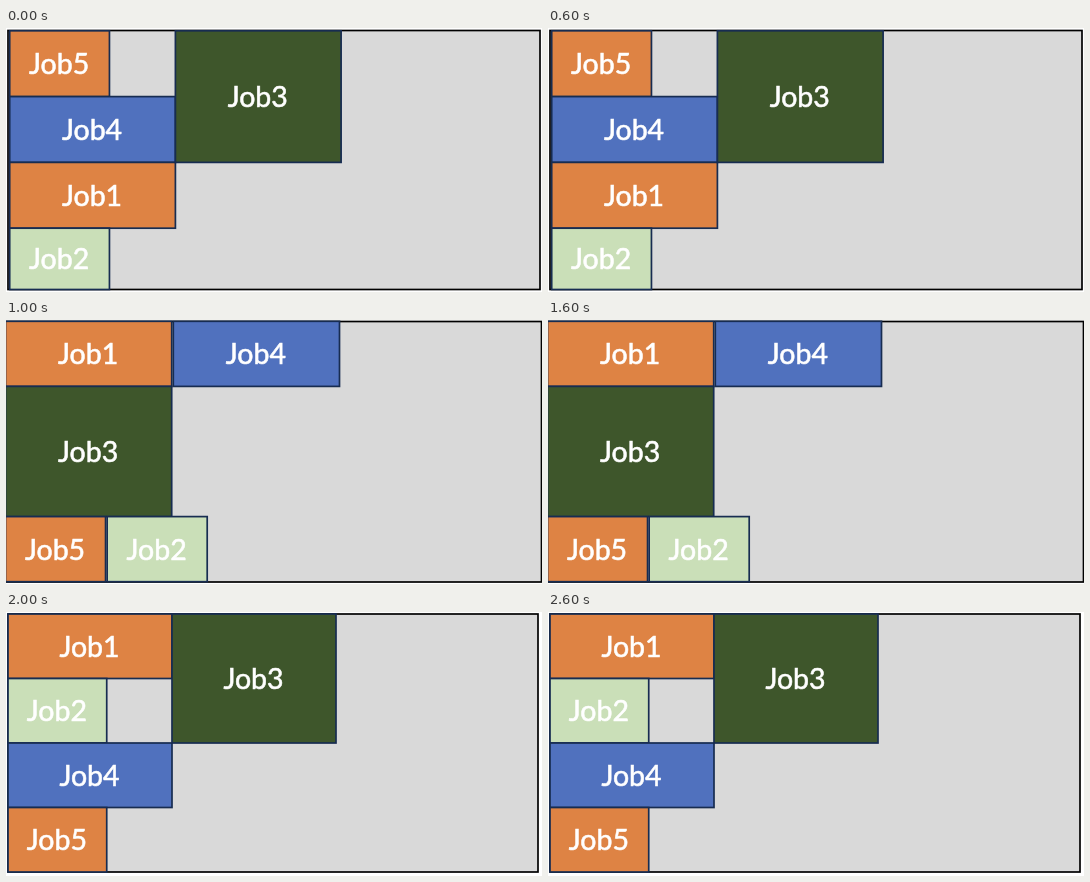
An HTML page with a canvas for the animation above (3000 ms loop, 536 by 264 pixels).

```html
<!DOCTYPE html>
<html lang="en">
<head>
<meta charset="utf-8">
<title>Job packing</title>
<style>
  html, body { margin: 0; overflow: hidden; background: #fff; }
  canvas { display: block; }
</style>
</head>
<body>
<canvas width="536" height="264"></canvas>
<script>
const ctx = document.querySelector('canvas').getContext('2d');
const STEP = 1000;
const SHORT = 0.602;

// Job sizes are in grid cells.
const jobs = {
  Job1: { color: '#de8344', cols: 1, rows: 1 },
  Job2: { color: '#cadfb8', cols: SHORT, rows: 1 },
  Job3: { color: '#3e562b', cols: 1, rows: 2 },
  Job4: { color: '#5071be', cols: 1, rows: 1 },
  Job5: { color: '#de8344', cols: SHORT, rows: 1 }
};

// Each column stacks its jobs downwards from the given row.
const layouts = [
  {
    area: { x: 2, y: 2.5, right: 534, bottom: 261.5 },
    grid: { x: 3.7, y: 2.8, w: 165.7, h: 65.8, gap: 0 },
    columns: [
      { col: 0, row: 0, stack: ['Job5', 'Job4', 'Job1', 'Job2'] },
      { col: 1, row: 0, stack: ['Job3'] }
    ]
  },
  {
    area: { x: -1, y: 1.5, right: 535.5, bottom: 262 },
    grid: { x: -0.5, y: 1.3, w: 166.2, h: 65.1, gap: 1.6 },
    columns: [
      { col: 0, row: 0, stack: ['Job1', 'Job3', 'Job5'] },
      { col: 1, row: 0, stack: ['Job4'] },
      { col: SHORT, row: 3, stack: ['Job2'] }
    ]
  },
  {
    area: { x: 2, y: 2, right: 532, bottom: 260 },
    grid: { x: 2, y: 2, w: 164, h: 64.5, gap: 0 },
    columns: [
      { col: 0, row: 0, stack: ['Job1', 'Job2', 'Job4', 'Job5'] },
      { col: 1, row: 0, stack: ['Job3'] }
    ]
  }
];

function drawBox(x, y, right, bottom, fill, stroke) {
  ctx.fillStyle = fill;
  ctx.strokeStyle = stroke;
  ctx.lineWidth = 1.7;
  ctx.fillRect(x, y, right - x, bottom - y);
  ctx.strokeRect(x, y, right - x, bottom - y);
}

function drawLabel(text, x, y) {
  ctx.fillStyle = ctx.strokeStyle = '#fff';
  ctx.lineWidth = 0.6;
  ctx.fillText(text, x, y);
  ctx.strokeText(text, x, y);
}

function drawColumn({ col, row, stack }, { area, grid }) {
  const x = grid.x + col * grid.w + (col && grid.gap);
  for (const name of stack) {
    const { color, cols, rows } = jobs[name];
    const y = grid.y + row * grid.h;
    const right = x + cols * grid.w;
    const bottom = Math.min(y + rows * grid.h, area.bottom);
    drawBox(x, y, right, bottom, color, '#172c51');
    drawLabel(name, (x + right) / 2 - 0.5, (y + bottom) / 2 + 10.5);
    row += rows;
  }
}

function render(now) {
  const layout = layouts[Math.floor(now / STEP) % layouts.length];
  const { x, y, right, bottom } = layout.area;
  ctx.clearRect(0, 0, 536, 264);
  ctx.font = '28.5px Lato, sans-serif';
  ctx.textAlign = 'center';
  drawBox(x, y, right, bottom, '#d9d9d9', '#000');
  layout.columns.forEach(column => drawColumn(column, layout));
  requestAnimationFrame(render);
}
requestAnimationFrame(render);
</script>
</body>
</html>
```
